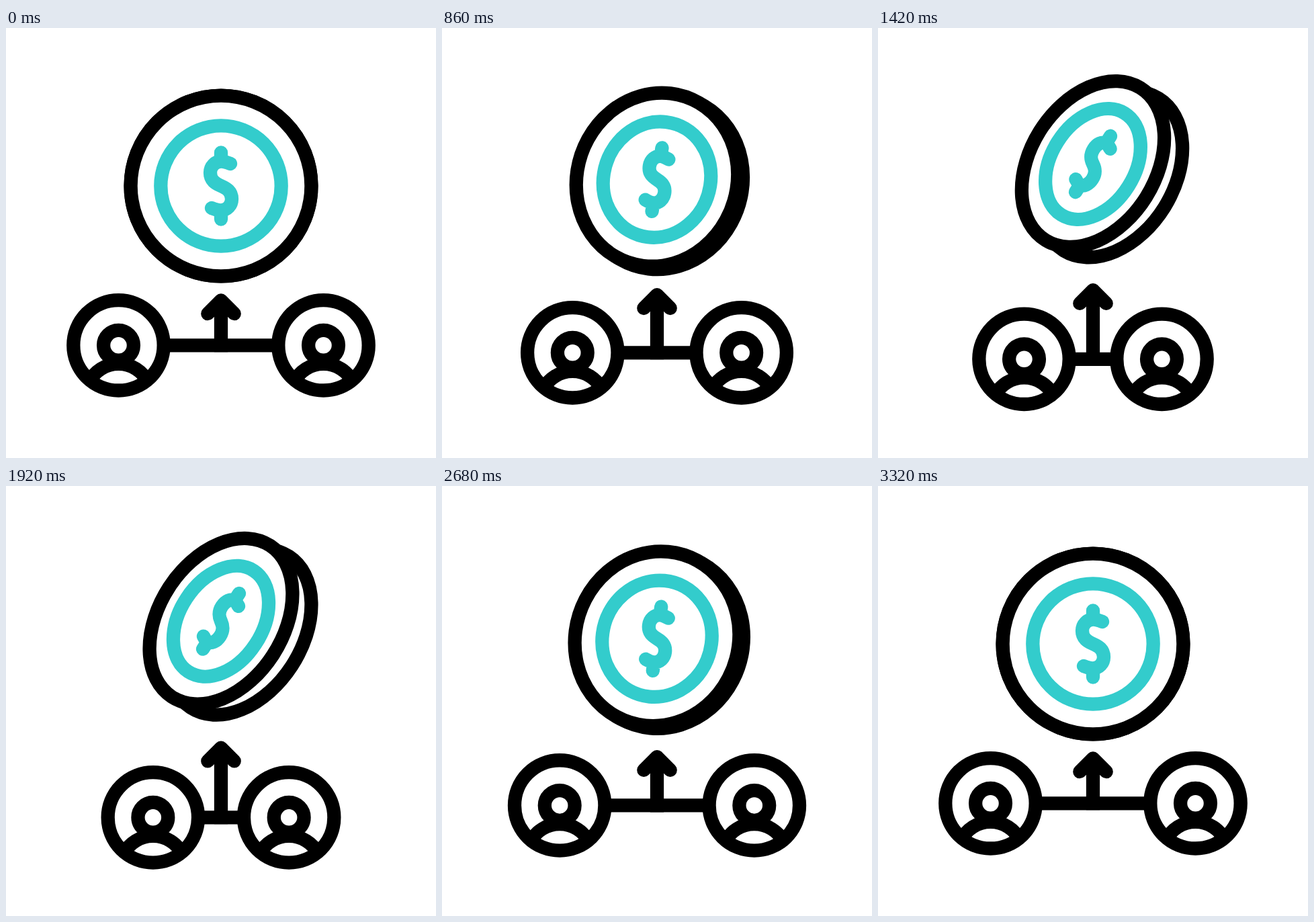
An HTML page that plays this animation: 640x640 px, repeating every 3600 ms.

```html
<!DOCTYPE html>
<html lang="en">
<head>
<meta charset="utf-8">
<title>Shared funding</title>
<style>
  html, body { margin: 0; width: 100%; height: 100%; overflow: hidden; background: #fff; }
  svg { display: block; width: 100%; height: 100%; }
  .line { fill: none; stroke: #000; stroke-width: 20.3; stroke-linejoin: round; }
  .round { stroke-linecap: round; }
  .face { fill: #fff; }
  .teal { stroke: #3cc; }
  .coin * { vector-effect: non-scaling-stroke; }
</style>
</head>
<body>
<svg viewBox="0 0 640 640">
  <defs>
    <g id="person">
      <circle r="67.2"/>
      <circle r="22.4"/>
      <path d="M-42.4 52A49 49 0 0 1 42.4 52"/>
    </g>
  </defs>

  <g class="line">
    <path id="link"/>
    <path id="stem"/>
    <path id="head" class="round" d="M300.3 425.2L320 405.4L339.7 425.2"/>
    <use id="left" href="#person"/>
    <use id="right" href="#person"/>
  </g>

  <g class="line coin">
    <circle id="back" class="face" r="134.4"/>
    <g id="front">
      <circle class="face" r="134.4"/>
      <g class="teal round">
        <circle r="89.7"/>
        <path d="M14 -33C9 -35 5 -36.5 .5 -36.5C-9 -36.5 -16 -29 -16 -19.5C-16 -8 -8 -3.5 0 0S16 8 16 19.5C16 29 9 36.5 -.5 36.5C-5 36.5 -9 35 -14 33M0 -49.5V-37M0 49.5V37"/>
      </g>
    </g>
  </g>
</svg>
<script>
  const LOOP = 3600;
  const part = Object.fromEntries(
    ['link', 'stem', 'head', 'left', 'right', 'back', 'front'].map(id => [id, document.getElementById(id)]));

  // Cubic easing with handles (a, 0) and (b, 1), solved by bisection.
  function ease(x, a, b) {
    if (x <= 0) return 0;
    if (x >= 1) return 1;
    let low = 0, high = 1, s = 0.5;
    for (let i = 0; i < 30; i++) {
      s = (low + high) / 2;
      const guess = 3 * s * (1 - s) ** 2 * a + 3 * s * s * (1 - s) * b + s ** 3;
      if (guess < x) low = s; else high = s;
    }
    return s * s * (3 - 2 * s);
  }

  const ramp = (t, start, length, a, b) => ease((t - start) / length, a, b);
  const peopleAt = t => ramp(t, 62, 1790, 0.8, 0.05) - ramp(t, 1829, 1477, 0.7, 0.12);
  const coinAt = t => 1.04 * (ramp(t, 100, 1715, 0.8, 0.2) - ramp(t, 1850, 1495, 0.7, 0.2));

  const place = (el, x, y) => el.setAttribute('transform', `translate(${x} ${y})`);

  function drawPeople(p) {
    const x = 152.5 - 51.5 * p, y = 472.3 + 21.1 * p, lift = -15.8 * p;
    place(part.left, 320 - x, y);
    place(part.right, 320 + x, y);
    place(part.head, 0, lift);
    part.link.setAttribute('d', `M${320 - x + 67} ${y}H${320 + x - 67}`);
    part.stem.setAttribute('d', `M320 ${405.4 + lift}V${y + 10}`);
  }

  function drawCoin(q) {
    const tilt = [1 - 0.41 * q, 0.363 * q, -0.525 * q, 1 - 0.157 * q];
    const y = 235 - 32.5 * q;
    const pose = (el, dx, dy) =>
      el.setAttribute('transform', `matrix(${[...tilt, 320 + dx, y + dy].join(' ')})`);
    pose(part.front, 0, 0);
    pose(part.back, 27 * q, 15.5 * q);
  }

  function render(t) {
    drawPeople(peopleAt(t));
    drawCoin(coinAt(t));
  }

  const began = performance.now();
  function tick() {
    render((performance.now() - began) % LOOP);
    requestAnimationFrame(tick);
  }
  tick();
</script>
</body>
</html>
```
